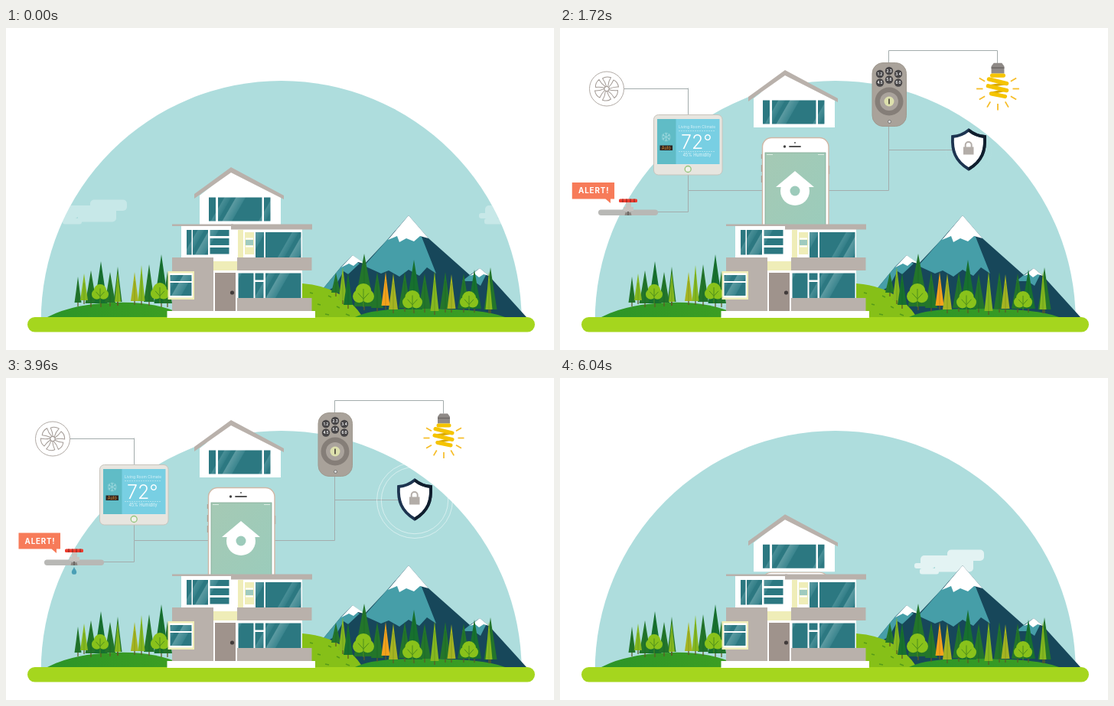
These frames come from a looping animation (716 px wide and 421 px high, 6080 ms). An HTML page:

```html
<!DOCTYPE html>
<html lang="en">
<head>
<meta charset="utf-8">
<title>Smart home</title>
<style>
html, body { margin: 0; width: 100%; height: 100%; overflow: hidden; background: #fff; }
svg { display: block; width: 716px; height: 421px; }
text { font-family: Inter, "Open Sans", sans-serif; fill: #fff; }
.wire { fill: none; stroke: #a3acac; stroke-width: 1; stroke-dasharray: 1 2; }
.wall { fill: #b9b1ab; }
.glass { fill: url(#glass); }
.cream { fill: #efedb8; }
.white { fill: #fff; }
</style>
</head>
<body>
<svg viewBox="0 0 716 421">
<defs>
  <linearGradient id="glass" gradientUnits="userSpaceOnUse" spreadMethod="repeat" x1="272" y1="95" x2="319" y2="122">
    <stop offset=".2" stop-color="#2c7881"/><stop offset=".22" stop-color="#488e96"/>
    <stop offset=".34" stop-color="#358089"/><stop offset=".36" stop-color="#2c7881"/>
    <stop offset=".44" stop-color="#2c7881"/><stop offset=".46" stop-color="#5b9aa1"/>
    <stop offset=".64" stop-color="#3c868f"/><stop offset=".66" stop-color="#2c7881"/>
  </linearGradient>
  <linearGradient id="screen" x1="0" y1="0" x2="1" y2="1">
    <stop offset="0" stop-color="#a5c9b4"/><stop offset="1" stop-color="#9accbc"/>
  </linearGradient>
  <linearGradient id="hill" x1="0" y1="0" x2="1" y2="0">
    <stop offset="0" stop-color="#2b9428"/><stop offset="1" stop-color="#3f9f22"/>
  </linearGradient>
  <clipPath id="domeClip"><circle cx="359.7" cy="383" r="314"/></clipPath>
  <clipPath id="aboveLedge"><rect width="716" height="259"/></clipPath>
  <g id="cloud" fill="#fff">
    <rect x="506" y="224.5" width="48" height="14.5" rx="5"/>
    <rect x="471" y="232" width="69" height="15" rx="5"/>
    <rect x="490" y="239" width="50" height="14.5" rx="5"/>
    <rect x="463" y="242" width="26" height="7" rx="3"/>
    <rect x="470" y="249" width="25" height="7.5" rx="3"/>
  </g>
</defs>

<path d="M45.7 383a314 314 0 0 1 628 0z" fill="#aedddd"/>
<g clip-path="url(#domeClip)">
  <g id="cloudL"><use href="#cloud" x="-396"/></g>
  <g id="cloudR"><use href="#cloud" x="155"/></g>
  <g id="cloudM"><use href="#cloud"/></g>
</g>

<!-- mountains -->
<path d="M396 378L405 352L438 312L453 297L468 309L499 276L526 245L552 275L606 323L619 314L631 324L680 378z" fill="#17475a"/>
<path d="M405 352L438 312L453 303L462 308L447 322L441 318L430 338z" fill="#469ea8"/>
<path d="M468 311L499 276L526 262L543 273L562 321L550 313L540 324L526 316L514 325L500 317L490 321z" fill="#469ea8"/>
<path d="M526 245L552 275L541 272L533 279L523 275L514 280L511 272L499 277z" class="white"/>
<path d="M453 297L468 308L460 306L454 311L448 308L438 313z" class="white"/>
<path d="M596 331L606 323L619 318L627 323L620 337L611 331z" fill="#469ea8"/>
<path d="M619 314L631 324L624 322L618 326L613 322L606 324z" class="white"/>

<!-- hills -->
<path d="M387 334Q441 338 466 378H380z" fill="#86c018"/>
<path d="M397 346l4 1M421 350l4 2M407 361l4 1M432 364l4 2M417 374l5 1M444 374l5 2M435 354l3 2" stroke="#569b18" stroke-width="1.5"/>
<path d="M54 378Q95 357 165 359Q205 361 240 378z" fill="url(#hill)"/>
<path d="M456 378Q480 366 545 367Q625 367 652 378z" fill="url(#hill)"/>
<g id="trees"></g>
<rect x="28" y="378" width="663" height="19.5" rx="9.7" fill="#a5d61e"/>

<g id="wires" transform="translate(-.5 -.5)"></g>

<!-- phone -->
<g clip-path="url(#aboveLedge)"><g id="phone">
  <path d="M263.5 165v6M263.5 179v9M263.5 193v9M351.5 180v11" stroke="#a89c94" stroke-width="1.4"/>
  <rect x="264.5" y="143.5" width="86.5" height="140" rx="12" fill="#fff" stroke="#d0b7a6" stroke-width="1.4"/>
  <rect x="268" y="163" width="79" height="115" fill="url(#screen)" stroke="#82a895" stroke-width=".8"/>
  <path d="M270 165.5h8M337 165.5h8" stroke="#e9f3ed" stroke-width=".8"/>
  <path d="M300 155h14" stroke="#555" stroke-width="1.8" stroke-linecap="round"/>
  <circle cx="293.5" cy="155" r="1.7" fill="#444"/><circle cx="307" cy="150" r="1" fill="#555"/>
  <path d="M307 187L332 208H282z" class="white"/>
  <circle cx="307" cy="213" r="19" class="white"/><circle cx="307" cy="213" r="6.5" fill="#9dcbbb"/>
</g></g>

<!-- top floor -->
<g id="roof">
  <path d="M253 92L294 60L359 92V130H253z" class="white"/>
  <path d="M294 55L363 92V97L294 62L246 96V90z" class="wall"/>
  <g id="topGlass"></g>
</g>

<!-- lower floors -->
<rect x="229" y="259" width="158" height="112" class="white"/>
<rect x="217" y="256.5" width="80" height="2.5" class="wall"/>
<rect x="294" y="256.5" width="106" height="7" class="wall"/>
<rect x="303" y="264" width="7" height="36" class="cream"/>
<rect x="312" y="267" width="12" height="29" class="cream"/>
<path d="M313 275.5h10M313 285.5h10" stroke="#fff" stroke-width="2"/>
<rect x="313" y="277" width="10" height="7" fill="#9fcabf"/>
<path d="M217 300H271V370H217z" class="wall"/>
<rect x="229" y="298" width="66" height="2" class="white"/>
<rect x="271" y="305" width="32" height="12" class="cream"/>
<rect x="302" y="300" width="97.5" height="17" class="wall"/>
<rect x="302" y="353" width="97.5" height="17" class="wall"/>
<rect x="273" y="320" width="27" height="50" fill="#9f938c"/>
<circle cx="295.5" cy="346" r="2.6" fill="#413b3a"/>
<rect x="211.5" y="318" width="34.5" height="37" class="cream"/>
<rect x="213.5" y="320.5" width="30.5" height="32" class="white"/>
<g id="houseGlass"></g>
<rect x="210.5" y="370" width="193.5" height="9" class="white"/>

<!-- thermostat -->
<g id="thermo">
  <rect x="122.5" y="113.5" width="89.5" height="78.5" rx="6" fill="#e7e5df" stroke="#c8c4bc"/>
  <rect x="127" y="119" width="81.5" height="59" fill="#78cfe3"/>
  <rect x="127" y="119" width="24.5" height="59" fill="#60bcc6"/>
  <g id="flake" stroke="#a5dce0" stroke-width=".8"></g>
  <rect x="130.5" y="153.5" width="16.5" height="6.5" fill="#2d2523"/>
  <text x="138.7" y="158.7" font-size="5.5" text-anchor="middle" style="fill:#f39b35">Auto</text>
  <text x="179" y="131" font-size="5" text-anchor="middle" opacity=".7">Living Room Climate</text>
  <path d="M155 134.5h48M155 161.5h48" stroke="#c4ebf3" stroke-width=".7" stroke-dasharray="2 1"/>
  <text x="158" y="157.5" font-size="25" font-weight="300">72°</text>
  <text x="179" y="168" font-size="5.5" text-anchor="middle" opacity=".8">45% Humidity</text>
  <circle cx="167.2" cy="184.5" r="4" fill="#f1f1ea" stroke="#93c47c" stroke-width="1.3"/>
</g>

<!-- fan -->
<g id="fan">
  <circle cx="61" cy="79.5" r="22.5" fill="#fff" stroke="#b1aaa5"/>
  <g id="blades" fill="#fff" stroke="#a39b96" stroke-width="1"></g>
</g>

<!-- tap -->
<g id="tap">
  <rect x="50" y="237.5" width="78" height="7.5" rx="3.7" fill="#b8b8b5"/>
  <path d="M86 228h7v6h3v5H83v-5h3z" fill="#c7c3bf"/>
  <path d="M84.5 245l1-4h7l1 4z" fill="#8c8782"/><path d="M89 240v5" stroke="#6c6865" stroke-width="2"/>
  <rect x="77" y="223.5" width="24" height="4.5" rx="1.5" fill="#ee3d2f"/>
  <path d="M82 223.5v4.5M87 223.5v4.5M92 223.5v4.5M97 223.5v4.5" stroke="#8e2b25" stroke-width="1.2"/>
</g>
<path id="drop" d="M0 -7C1 -3 4.8 0 4.8 3.5A4.8 4.8 0 0 1 -4.8 3.5C-4.8 0 -1 -3 0 -7z" fill="#4b9fb5"/>
<g id="alert">
  <path d="M16.5 202.5H71V223.5H66V229L59.5 223.5H16.5z" fill="#f77b59"/>
  <text x="44.5" y="216.5" font-size="9.8" font-weight="700" letter-spacing=".8" text-anchor="middle">ALERT!</text>
</g>

<!-- keypad -->
<g id="keypad">
  <rect x="408" y="45.5" width="44.5" height="83" rx="14" fill="#a9a29a" stroke="#a0998f"/>
  <g id="keys"></g>
  <circle cx="430" cy="96" r="18.5" fill="#857e78"/><circle cx="430" cy="96" r="12" fill="#aaa39c"/>
  <circle cx="430" cy="96" r="6.5" fill="#dde0ad"/><path d="M430 92.5v7" stroke="#545043" stroke-width="1.8"/>
  <circle cx="430.5" cy="122.5" r="2" fill="#ddd" stroke="#666" stroke-width=".8"/>
</g>

<!-- bulb -->
<g id="bulb">
  <g id="rays" stroke="#f6bd27" stroke-width="1.7"></g>
  <path d="M567 46.500h10l3 4v9h-16v-9z" fill="#8f8a87"/><path d="M564 52.500h16" stroke="#6e6967" stroke-width="1.5"/>
  <g fill="none" stroke-linecap="round">
    <path d="M583 72L561 75M583 80L563 84" stroke="#d9a900" stroke-width="3"/>
    <path d="M565 62H579M561 66.500L583 72M560 75L583 80.500M564 84.500L581 88" stroke="#f5c400" stroke-width="5"/>
  </g>
</g>

<!-- shield -->
<g id="rings" fill="none" stroke="#fff"><circle cx="534" cy="160"/><circle cx="534" cy="160"/></g>
<g id="shield">
  <path d="M534 133.500Q543 141 555 142C556 160 552 174 534 184.500C516 174 512 160 513 142Q525 141 534 133.500z" fill="#fff" stroke="#1d3450" stroke-width="3.800"/>
  <path d="M534 133.500Q543 141 555 142C556 160 552 174 534 184.500" fill="none" stroke="#101e2d" stroke-width="3.800"/>
  <rect x="527" y="155.5" width="13.5" height="10" fill="#b3ada8"/>
  <path d="M529.7 156v-3a4 4 0 0 1 8 0v3" fill="none" stroke="#b3ada8" stroke-width="2"/>
</g>
</svg>

<script>
const LOOP = 6080;
const $ = id => document.getElementById(id);
const clamp = v => Math.min(1, Math.max(0, v));
const span = (t, a, b) => clamp((t - a) / (b - a));
const inOut = p => p < .5 ? 2 * p * p : 1 - 2 * (1 - p) ** 2;
const back = p => p ? 1 + 2.4 * (p - 1) ** 3 + 1.4 * (p - 1) ** 2 : 0;

// ---- static parts ----
const rect = (x, y, w, h) => `<rect class="glass" x="${x}" y="${y}" width="${w}" height="${h}"/>`;
const panes = list => list.map(r => rect(...r)).join('');
$('topGlass').innerHTML = panes([[265, 94.5, 9, 31], [277, 94.5, 57.5, 31], [337, 94.5, 8.5, 31]]);
$('houseGlass').innerHTML = panes([
  [236, 264, 6.5, 32.5], [244, 264, 20, 32.5],
  [266.5, 264, 25, 8], [266.5, 275, 25, 9], [266.5, 287, 25, 8.5],
  [326, 267, 11, 33], [339, 267, 46.5, 33],
  [303.5, 320.5, 20, 32.5], [325.5, 320.5, 11, 9], [325.5, 332, 11, 21], [339, 320.5, 46.5, 32.5],
  [214.5, 323, 28, 8], [214.5, 333, 28, 17]
]);

const DARK = '#23752b', DEEP = '#17702f', LIME = '#86b820', OLIVE = '#a6b422', ORANGE = '#f6a21c';
const cone = (x, top, base, w, color) =>
  `<path d="M${x} ${base}v5" stroke="#5f5a25" stroke-width="1.3"/>
   <path d="M${x} ${top}L${x + w * .24} ${top + (base - top) * .5}L${x + w / 2} ${base}H${x - w / 2}L${x - w * .24} ${top + (base - top) * .5}z" fill="${color}"/>
   <path d="M${x} ${top + 12}V${base}" stroke="#0a4b1d" stroke-opacity=".2"/>`;
const round = (x, y, r) =>
  `<g fill="#89c21b"><circle cx="${x}" cy="${y - r * .25}" r="${r * .75}"/>
   <circle cx="${x - r * .4}" cy="${y + r * .2}" r="${r * .6}"/><circle cx="${x + r * .4}" cy="${y + r * .2}" r="${r * .6}"/></g>
   <path d="M${x} ${y - r * .5}V${y + r + 3}M${x - r * .5} ${y - r * .1}L${x} ${y + r * .45}L${x + r * .5} ${y - r * .1}" fill="none" stroke="#4c8d1c"/>`;
$('trees').innerHTML = [
  [94, 325, 359, 9, DARK], [111, 317, 360, 15, DARK], [124, 305, 360, 17, DEEP], [136, 319, 359, 14, DARK],
  [102, 321, 356, 10, LIME], [146, 312, 358, 11, DARK], [146, 319, 358, 8, LIME],
  [187, 309, 358, 14, DARK], [203, 296, 360, 19, DEEP], [211, 318, 360, 12, DARK],
  [168, 319, 357, 10, OLIVE], [177, 310, 357, 9, LIME],
  [431, 320, 346, 12, DARK], [440, 313, 356, 11, LIME], [468, 295, 364, 27, DARK], [447, 320, 362, 12, DEEP],
  [485, 319, 366, 16, DARK], [521, 319, 366, 16, DARK], [533, 303, 368, 22, DEEP], [547, 321, 367, 16, DARK],
  [496, 319, 363, 11, ORANGE], [506, 321, 368, 12, OLIVE],
  [574, 319, 367, 14, DARK], [598, 321, 367, 16, DARK], [612, 316, 367, 18, DEEP], [633, 313, 368, 17, DARK],
  [560, 318, 370, 11, LIME], [582, 322, 367, 11, OLIVE], [631, 318, 368, 9, LIME]
].map(a => cone(...a)).join('') +
  [[123, 346, 11], [201, 345, 12], [467, 348, 14], [531, 356, 13], [605, 356, 12]].map(a => round(...a)).join('');

const repeat = (n, f) => Array.from({ length: n }, (_, i) => f(i)).join('');
$('flake').innerHTML = repeat(6, i =>
  `<path transform="translate(138.7 142.5) rotate(${i * 60})" d="M0 0V-6M-2 -5.5L0 -3.5L2 -5.5" fill="none"/>`);
$('blades').innerHTML = repeat(6, i =>
  `<path transform="rotate(${i * 60})" d="M0 -3Q-1 -9 -4 -14Q1 -17 7 -14Q3 -9 2 -3z"/>`) + '<circle r="3"/>';
$('keys').innerHTML = repeat(6, i => {
  const x = 418 + i % 3 * 12, y = (i < 3 ? 60 : 71.5) - (i % 3 === 1 ? 4 : 0);
  return `<circle cx="${x}" cy="${y}" r="5.2" fill="#474547"/>
    <text x="${x}" y="${y + 1.7}" font-size="4.5" font-weight="700" text-anchor="middle">${i + 1}.${(i + 2) % 7}</text>`;
});
$('rays').innerHTML = repeat(9, i =>
  `<path transform="translate(572 78.5) rotate(${(i - 4) * 30})" d="M0 18.5V26.5"/>`);

// ---- wires: path, grow from/to, shrink from/to ----
const wires = [
  ['M307 213H168', 700, 860, 5620, 5740], ['M307 213H430', 860, 1050, 5600, 5740],
  ['M168 213V79', 860, 963, 5500, 5620], ['M168 213V241', 860, 963, 5500, 5620],
  ['M168 80H83', 963, 1330, 5120, 5500], ['M168 241H128', 963, 1140, 5320, 5500],
  ['M430 213V30', 1050, 1330, 5420, 5600], ['M430 160H520', 1250, 1480, 5280, 5480],
  ['M430 30H572V47', 1320, 1560, 5180, 5430]
].map(([d, ...times]) => {
  const el = document.createElementNS('http://www.w3.org/2000/svg', 'path');
  el.setAttribute('d', d);
  el.setAttribute('pathLength', 1);
  el.setAttribute('class', 'wire');
  $('wires').append(el);
  return { el, times };
});

// ---- popping parts: id, centre, in from/to, out from/to ----
const pops = [
  ['thermo', 167, 153, 780, 1110, 5420, 5640], ['fan', 61, 79.5, 1300, 1600, 4900, 5120],
  ['tap', 89, 241, 1300, 1600, 5140, 5380], ['keypad', 430, 87, 1050, 1340, 5400, 5640],
  ['bulb', 572, 60, 1500, 1800, 4980, 5240], ['shield', 534, 160, 1420, 1720, 5140, 5400]
];
const popScale = (t, a, b, c, d) => back(span(t, a, b)) * (1 - inOut(span(t, c, d)));
const scaleAt = (el, x, y, s) => {
  el.style.display = s > .001 ? '' : 'none';
  el.setAttribute('transform', `translate(${x} ${y}) scale(${s}) translate(${-x} ${-y})`);
};

const pulse = [[1700, 1], [1960, 1.19], [2320, 1], [2760, 1.19], [3040, 1], [3160, 1.07], [3480, 1.19],
  [3900, 1], [4160, 1], [4480, 1.1], [4680, 1.14], [4800, 1.19], [5100, 1]];
const pulseAt = t => {
  const i = pulse.findIndex(p => p[0] > t);
  if (i < 1) return 1;
  const [a, u] = pulse[i - 1], [b, v] = pulse[i];
  return u + (v - u) * inOut(span(t, a, b));
};

const drips = [1800, 2400, 3000, 3440, 3880, 4440, 4960];

function drawDrop(t) {
  const start = drips.filter(d => d <= t).pop();
  const age = t - start;
  const on = age >= 0 && age < 480;
  $('drop').style.display = on ? '' : 'none';
  if (!on) return;
  const grow = span(age, 0, 260), fall = span(age, 270, 480);
  const s = .5 + .54 * grow;
  $('drop').setAttribute('transform', `translate(89 ${249.3 + 6.5 * grow + 56 * fall * fall}) scale(${s})`);
}

function drawRings(t) {
  const show = span(t, 1700, 1900) * (1 - span(t, 5100, 5250));
  const p = ((t - 2904) / 1280 % 1 + 1) % 1;
  [...$('rings').children].forEach((ring, i) => {
    ring.setAttribute('r', 28 + 26 * p - i * 7 * p);
    ring.setAttribute('opacity', show * .5 * Math.min(1, p * 4, (1 - p) * 6));
  });
}

function draw(t) {
  const lift = inOut(span(t, 60, 600)) * (1 - inOut(span(t, 5760, 6080)));
  $('roof').setAttribute('transform', `translate(0 ${127 * (1 - lift)})`);
  $('phone').setAttribute('transform', `translate(0 ${114 * (1 - lift)})`);

  const leave = .32 * (1 - span(t, 0, 240));
  $('cloudL').setAttribute('opacity', leave);
  $('cloudR').setAttribute('opacity', leave);
  $('cloudM').setAttribute('opacity', .66 * span(t, 5780, 6040));

  for (const { el, times: [a, b, c, d] } of wires) {
    const p = span(t, a, b) * (1 - span(t, c, d));
    el.style.display = p ? '' : 'none';
    el.setAttribute('stroke-dashoffset', 1 - p);
  }
  for (const [id, x, y, ...times] of pops) scaleAt($(id), x, y, popScale(t, ...times));
  scaleAt($('alert'), 66, 229, popScale(t, 1600, 1880, 4900, 5110) * pulseAt(t));
  $('blades').setAttribute('transform', `translate(61 79.5) rotate(${t * .38})`);
  drawDrop(t);
  drawRings(t);
}

const begin = performance.now();
function tick() {
  draw((performance.now() - begin) % LOOP);
  requestAnimationFrame(tick);
}
tick();
</script>
</body>
</html>
```
